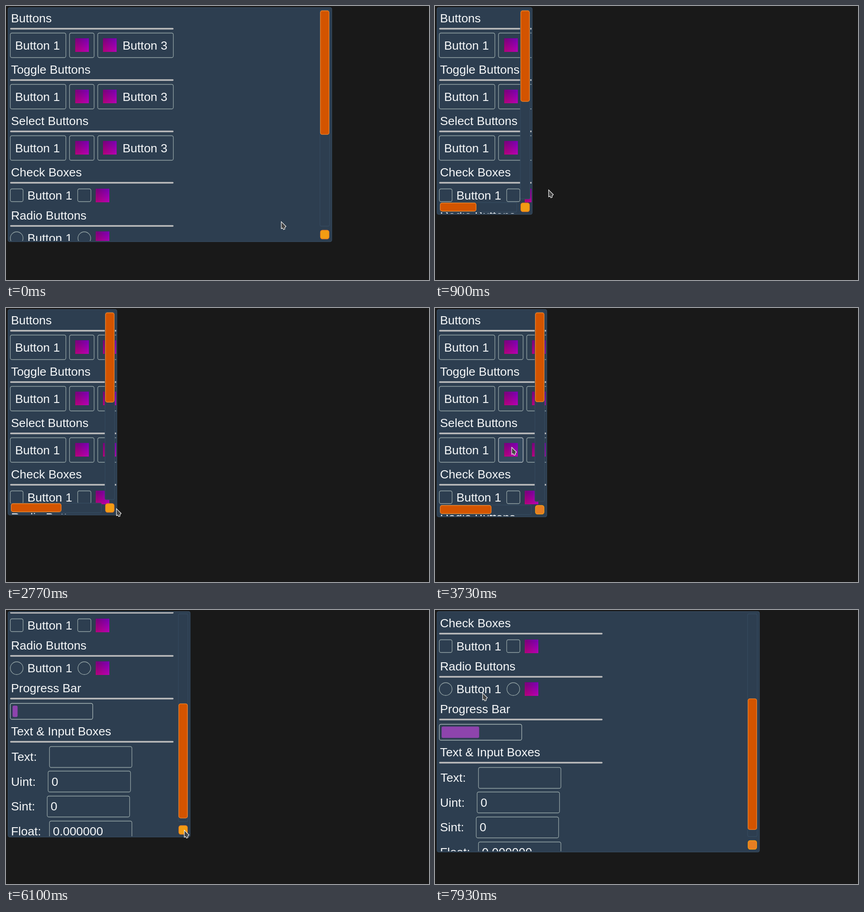
An HTML page with a canvas that plays this animation: 929 px wide and 603 px high, repeating every 8 s.

```html
<!DOCTYPE html>
<html lang="en">
<head>
<meta charset="utf-8">
<title>Resizable widget panel</title>
<style>
html, body { margin: 0; width: 100%; height: 100%; overflow: hidden; background: #191919; }
canvas { display: block; }
</style>
</head>
<body>
<canvas id="stage" width="929" height="603"></canvas>
<script>
const ctx = document.getElementById('stage').getContext('2d');
const LOOP = 8000, CONTENT_W = 358, CONTENT_H = 890;
const PANEL = '#2d3e50', EDGE = '#34495e', LINE = '#95a5a6', HOVER = '#34495e';

// Keys are [time, ...values]; a bare time holds the values before it.
const hold = keys => {
  let last;
  return keys.map(k => last = k.length > 1 ? k : [k[0], ...last.slice(1)]);
};

const CORNER = hold([
  [0, 716, 519], [29], [30, 650, 506], [170], [640, 150, 480], [900, 214, 459], [1270],
  [1490, 480, 560], [1720, 165, 405], [1800, 169, 394], [2070, 235, 440], [2930, 246, 460],
  [5830], [6400, 580, 545], [6630, 688, 561], [6700], [7050, 713, 533], [LOOP]
]);
const POINTER = hold([
  [0, 604, 474], [29], [30, 545, 450], [170], [640, 125, 465], [900, 249, 404], [1270],
  [1490, 519, 582], [1720, 140, 355], [1800, 197, 364], [2070, 250, 430], [2930, 240, 444],
  [3130, 215, 400], [3330], [3730, 168, 306], [4930, 180, 330], [5200, 250, 444],
  [5730, 233, 442], [7200, 699, 517], [7470, 343, 348], [7930, 104, 182], [LOOP]
]);
const SIDEWAYS = hold([[0, 0], [3000], [3130, 60], [3330], [3450, 110], [3650, 0], [LOOP]]);
const PROGRESS = [[0, 14], [3200, 186], [5200, 73], [6330, 14], [6700, 33], [LOOP, 101]];

const ARROW = new Path2D('M0 0V15.5L3 14L5 17.5L8 16.5L7.5 13.5L10.5 10.5Z');

function at(keys, t) {
  const i = Math.max(1, keys.findIndex(k => k[0] >= t));
  const a = keys[i - 1], b = keys[i], u = (t - a[0]) / (b[0] - a[0]);
  return a.slice(1).map((v, n) => v + (b[n + 1] - v) * u);
}

function box(x0, y0, x1, y1, r, fill, stroke) {
  ctx.beginPath();
  ctx.roundRect(x0 + .5, y0 + .5, Math.max(0, x1 - x0 - 1), Math.max(0, y1 - y0 - 1), r);
  if (fill) { ctx.fillStyle = fill; ctx.fill(); }
  if (stroke) { ctx.strokeStyle = stroke; ctx.lineWidth = 1.3; ctx.stroke(); }
}

function text(s, x, y) {
  ctx.fillStyle = '#f6f8f9';
  ctx.fillText(s, x, y);
}

function icon(x, y) {
  const layer = (x1, y1, from, to) => {
    const g = ctx.createLinearGradient(x, y, x1, y1);
    g.addColorStop(0, from);
    g.addColorStop(1, to);
    ctx.fillStyle = g;
    ctx.fillRect(x, y, 30, 30);
  };
  layer(x + 30, y, '#000078', '#0000b4');
  ctx.globalCompositeOperation = 'lighter';
  layer(x, y + 30, '#780000', '#b40000');
  ctx.globalCompositeOperation = 'source-over';
}

function header(s, y) {
  text(s, 11, y + 9);
  ctx.fillStyle = '#bdbdbd';
  ctx.beginPath();
  ctx.roundRect(9, y + 21.2, CONTENT_W + 1, 3.6, 1.8);
  ctx.fill();
}

function drawContent(px, py, progress) {
  const field = (x0, y0, x1, y1) => {
    const over = px >= x0 && px < x1 && py >= y0 && py < y1;
    box(x0, y0, x1, y1, 3.5, over ? HOVER : null, over ? '#bdc3c7' : LINE);
  };
  ['Buttons', 'Toggle Buttons', 'Select Buttons'].forEach((name, i) => {
    const y = 27 + i * 113;
    header(name, y);
    field(9, y + 32, 132, y + 87);
    field(139, y + 32, 194, y + 87);
    field(201, y + 32, 368, y + 87);
    text('Button 1', 20, y + 69);
    icon(152, y + 44);
    icon(213, y + 44);
    text('Button 3', 256, y + 69);
  });

  header('Check Boxes', 366);
  box(9, 402, 38, 431, 3.5, null, LINE);
  box(157, 402, 187, 431, 3.5, null, LINE);
  header('Radio Buttons', 461);
  box(9, 496.5, 38, 525.5, 14, null, LINE);
  box(157.5, 496.5, 186.5, 525.5, 14, null, LINE);
  for (const y of [402, 496]) {
    text('Button 1', 47, y + 24);
    icon(197, y);
  }

  header('Progress Bar', 555);
  box(9, 588, 191, 624, 3.5, null, '#a9b8b8');
  box(14, 593, progress, 619, 3, '#8e44ad');

  header('Text & Input Boxes', 650);
  [['Text:', 95, ''], ['Uint:', 92, '0'], ['Sint:', 90, '0'], ['Float:', 95, '0.000000']]
    .forEach(([label, x, value], i) => {
      const y = 682.5 + i * 54.67;
      text(label, label[0] === 'T' ? 12 : 11, y + 32.5);
      field(x, Math.round(y), x + 182, Math.round(y) + 47);
      text(value, x + 8, y + 32.5);
    });
}

function drawPointer(x, y) {
  ctx.save();
  ctx.translate(x + .5, y + .5);
  ctx.fillStyle = '#454545';
  ctx.fill(ARROW);
  ctx.strokeStyle = '#fff';
  ctx.lineWidth = 1.1;
  ctx.stroke(ARROW);
  ctx.restore();
}

function draw(t) {
  const [right, bottom] = at(CORNER, t).map(Math.round);
  const onGrip = t > 5790 && t < 7200;
  const [px, py] = onGrip ? [right - 14, bottom - 16] : at(POINTER, t).map(Math.round);
  const dragging = t < 2930 || onGrip;
  const narrow = right < 395;

  const [sx] = at(SIDEWAYS, t);
  const wheel = 383 * Math.min(1, Math.max(0, (t - 3900) / 1030));
  const sy = Math.min(wheel, CONTENT_H + 8 - (t > 6630 ? 561 : bottom));

  ctx.fillStyle = '#191919';
  ctx.fillRect(0, 0, 929, 603);
  ctx.font = '26.4px "Liberation Sans", Arial, sans-serif';
  box(4, 3, right, bottom, 3.5, PANEL, EDGE);

  ctx.save();
  ctx.beginPath();
  ctx.rect(5, 5, right - 7, bottom - 7);
  ctx.clip();
  ctx.translate(-Math.round(sx), -Math.round(sy));
  const reach = dragging ? -1e4 : 0;
  drawContent(px + sx + reach, py + sy, at(PROGRESS, t)[0]);
  ctx.restore();

  // vertical bar
  const len = bottom - 45, hidden = !narrow ? 8 : t < 2930 ? 30 : 40;
  const top = 10 + sy * len / CONTENT_H;
  box(right - 27, 8, right - 5, bottom - 34, 3, PANEL, EDGE);
  box(right - 26, top, right - 6, top + len * (bottom - hidden) / CONTENT_H + 1, 4, '#d35400', '#f0862a');

  // horizontal bar
  if (narrow) {
    const w = right - 45, left = 11 + sx * w / CONTENT_W;
    box(10, bottom - 27, right - 34, bottom - 5, 3, PANEL, EDGE);
    box(left, bottom - 26, left + w * w / CONTENT_W, bottom - 7, 4, '#d35400', '#f0862a');
  }

  box(right - 26, bottom - 26, right - 6, bottom - 6, 4.5,
    dragging ? '#f39c12' : '#e67e22', dragging ? '#e67e22' : '#f39c12');
  drawPointer(px, py);
}

const start = performance.now();
function tick() {
  draw((performance.now() - start) % LOOP);
  requestAnimationFrame(tick);
}
tick();
</script>
</body>
</html>
```
